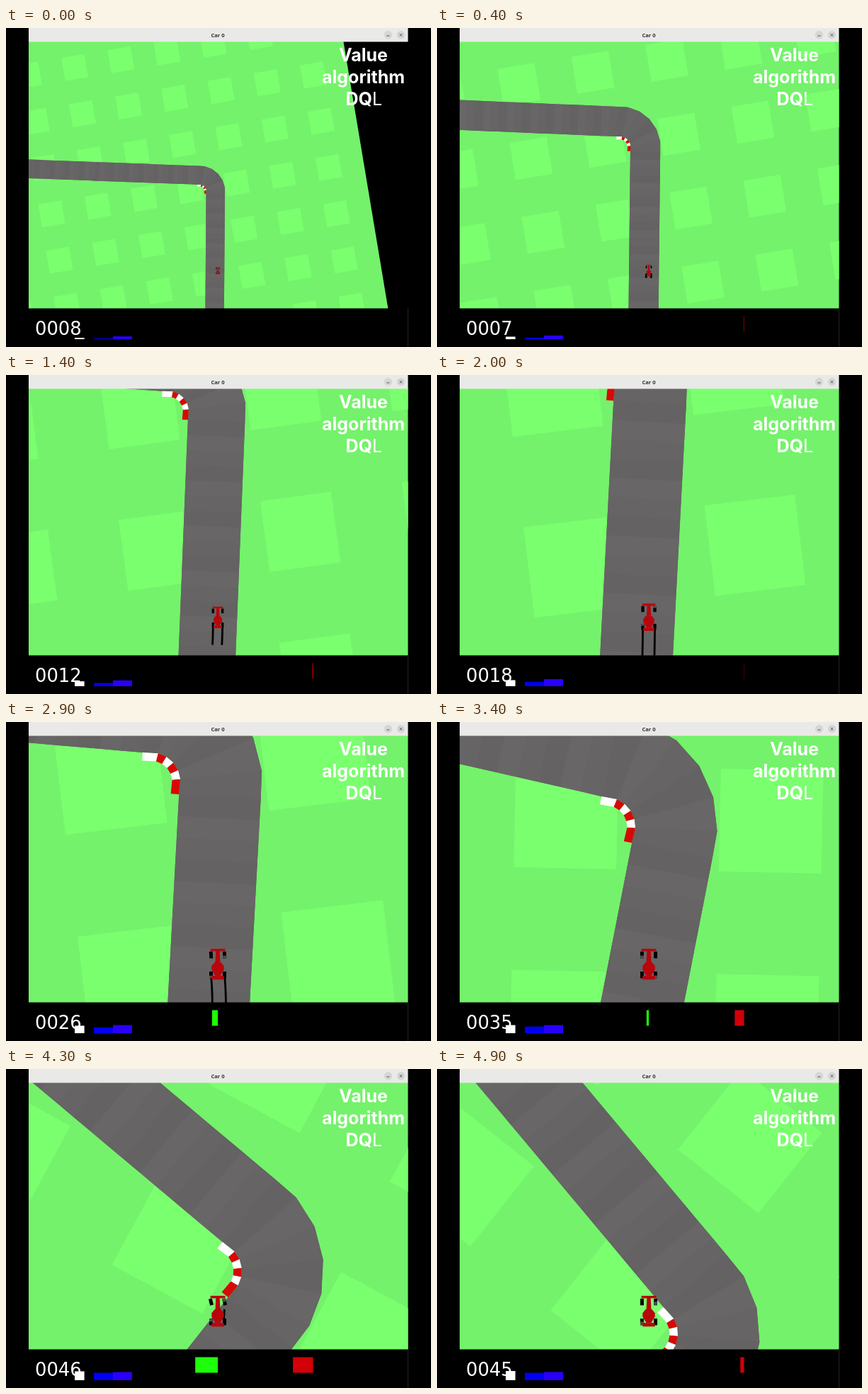
An HTML page with a canvas that plays this animation: 600 by 450 pixels, repeating every 5 s.

```html
<!DOCTYPE html>
<html lang="en">
<head>
<meta charset="utf-8">
<title>Car 0</title>
<style>
html, body { margin: 0; width: 100%; height: 100%; overflow: hidden; background: #000; }
canvas { display: block; width: 600px; height: 450px; }
</style>
</head>
<body>
<canvas id="stage" width="600" height="450"></canvas>
<script>
const ctx = document.getElementById('stage').getContext('2d');
const RAD = Math.PI / 180;
const GRASS = 144.7;        // side of one lawn square at full zoom
const CAR = 0.1736;         // car model units to pixels
const CENTER = { x: 299, y: 342.5 };

// Waypoints of the car on the lawn: time, x, y
const PATH = [
  [0, -131, 588], [0.8, -123.4, 555.3], [2, -109, 455.9], [2.9, -97.5, 352.2],
  [3.8, -102.5, 214.4], [4.3, -126.5, 132], [4.9, -179.5, 60.3]
];
// Turns: start, end, degrees
const TURNS = [[0, 2.2, 2.7], [2.9, 3.8, 13.7], [3.78, 4.55, 28.5], [4.4, 5.4, 6]];
const SLOPES = pathSlopes();
const ROAD = buildRoad();

function pathSlopes() {
  const last = PATH.length - 1;
  const chord = (i, k) => (PATH[i + 1][k] - PATH[i][k]) / (PATH[i + 1][0] - PATH[i][0]);
  const inner = (i, k) => {
    const before = PATH[i][0] - PATH[i - 1][0], after = PATH[i + 1][0] - PATH[i][0];
    return (chord(i - 1, k) * after + chord(i, k) * before) / (before + after);
  };
  return PATH.map((_, i) => [1, 2].map(k => {
    if (i === 0) return 1.5 * chord(0, k) - 0.5 * inner(1, k);
    if (i === last) return 1.5 * chord(last - 1, k) - 0.5 * inner(last - 1, k);
    return inner(i, k);
  }));
}

// Walk along the centre line; tiles 0 to 5 make the bend.
// Each cut across the road is a function from side offset to a point.
function buildRoad() {
  const STEP = 30.5, BEFORE = 28, AFTER = 50;
  const heading = i => (-16.8 + 17.65 * Math.min(5, Math.max(0, i))) * RAD;
  let x = 347 + BEFORE * STEP * Math.sin(heading(0));
  let y = 250 + BEFORE * STEP * Math.cos(heading(0));
  const cuts = [];
  for (let i = -BEFORE; i < AFTER; i++) {
    const h = heading(i), a = (heading(i - 1) + h) / 2, px = x, py = y;
    cuts.push({ i, at: side => [px + side * Math.cos(a), py - side * Math.sin(a)] });
    x -= STEP * Math.sin(h);
    y -= STEP * Math.cos(h);
  }
  return cuts;
}

function position(t) {
  let i = 0;
  while (i < PATH.length - 2 && t > PATH[i + 1][0]) i++;
  const a = PATH[i], b = PATH[i + 1], d = b[0] - a[0];
  const s = (t - a[0]) / d, r = 1 - s;
  return [1, 2].map(k =>
    a[k] + (b[k] - a[k]) * s * s * (3 - 2 * s) +
    d * s * r * (SLOPES[i][k - 1] * r - SLOPES[i + 1][k - 1] * s));
}

function pose(t) {
  const [x, y] = position(t);
  let deg = -9.5, rate = 0;
  for (const [from, to, amount] of TURNS) {
    const s = Math.min(1, Math.max(0, (t - from) / (to - from)));
    deg += amount * s * s * (3 - 2 * s);
    rate += amount / (to - from) * 6 * s * (1 - s);
  }
  return { x, y, angle: deg * RAD, rate };
}

const bump = (t, mid, half) => Math.max(0, 1 - ((t - mid) / half) ** 2);
const steering = t => 12 * bump(t, 3.1, 0.35) + 32 * bump(t, 4.27, 0.4);

function poly(points, fill) {
  ctx.fillStyle = fill;
  ctx.beginPath();
  points.forEach(([x, y]) => ctx.lineTo(x, y));
  ctx.fill();
}

function rect(x, y, w, h, fill) {
  ctx.fillStyle = fill;
  ctx.fillRect(x, y, w, h);
}

function label(text, x, y, font, fill, align) {
  ctx.font = font;
  ctx.fillStyle = fill;
  ctx.textAlign = align;
  ctx.fillText(text, x, y);
}

function drawLawn() {
  rect(-34 * GRASS, -34 * GRASS, 40 * GRASS, 68 * GRASS, '#74f26b');
  for (let i = -20; i < 6; i += 2) {
    for (let j = -20; j < 20; j += 2) {
      rect(i * GRASS, j * GRASS, GRASS, GRASS, '#7aff6e');
    }
  }
}

function drawRoad() {
  const HALF = 57.8, KERB = 11.6;
  const band = (a, b, from, to, fill) =>
    poly([a.at(from), a.at(to), b.at(to), b.at(from)], fill);
  ctx.save();
  ctx.rotate(-6.9 * RAD);
  ctx.translate(-427, -142);
  poly([...ROAD.map(c => c.at(-HALF)), ...ROAD.map(c => c.at(HALF)).reverse()], '#666464');
  ROAD.slice(1).forEach((cut, n) => {
    const shade = 100 + 2 * (n % 3);
    band(ROAD[n], cut, -HALF, HALF, `rgb(${shade},${shade - 2},${shade - 2})`);
  });
  ROAD.forEach((cut, n) => {
    if (cut.i < 0 || cut.i > 5) return;
    band(cut, ROAD[n + 1], -HALF - KERB, -HALF, cut.i % 2 ? '#fff' : '#d80808');
  });
  ctx.restore();
}

// Tyre mark left between two times by the wheel at (wx, wy)
function drawSkid(t, zoom, from, to, wx, wy) {
  const end = Math.min(to, t);
  if (end <= from) return;
  ctx.strokeStyle = '#000';
  ctx.lineWidth = 2.8 / zoom;
  ctx.beginPath();
  for (let i = 0; i <= 20; i++) {
    const { x, y, angle } = pose(from + (end - from) * i / 20);
    const c = Math.cos(angle) * CAR, s = Math.sin(angle) * CAR;
    ctx.lineTo(x + wx * c - wy * s, y - wx * s - wy * c);
  }
  ctx.stroke();
}

function drawSkids(t, zoom) {
  for (const side of [-55, 55]) {
    drawSkid(t, zoom, 0.03, 0.4, side, -82);
    drawSkid(t, zoom, 0.85, 2.87, side, -82);
  }
  drawSkid(t, zoom, 4.16, 4.24, 55, 80);
}

function drawWheel(x, y, turn, spin) {
  ctx.save();
  ctx.translate(x, y);
  ctx.rotate(turn);
  rect(-14, -27, 28, 54, '#000');
  if (Math.sin(spin) < 0 && Math.sin(spin + 1.2) < 0) {
    const a = 27 * Math.cos(spin), b = 27 * Math.cos(spin + 1.2);
    rect(-14, a, 28, b - a, '#4d4d4d');
  }
  ctx.restore();
}

function drawCar(t, zoom) {
  const RED = '#b8060c';
  const mirror = half => [...half, ...half.map(([x, y]) => [-x, y]).reverse()];
  ctx.save();
  ctx.translate(CENTER.x, CENTER.y);
  ctx.scale(zoom * CAR, -zoom * CAR);
  for (const x of [-55, 55]) {
    drawWheel(x, 80, steering(t) / 134, t * 19 + x);
    drawWheel(x, -82, 0, t * 19 - x);
  }
  rect(-60, 110, 120, 20, RED);
  rect(-50, -120, 100, 30, RED);
  poly(mirror([[15, 120], [20, 20]]), RED);
  poly(mirror([[25, 20], [50, -10], [50, -40], [20, -90]]), RED);
  ctx.restore();
}

function drawHud(t, rate) {
  rect(32, 395.5, 536, 54.5, '#000');
  rect(567, 395.5, 1, 54.5, '#242424');

  const rising = (x, w, h, fill) => rect(x, 439 - h, w, h, fill);
  rising(97, 13.6, 2 + 4 * t - 0.36 * t * t, '#fff');
  rising(124, 27, Math.min(10.5, 1.2 + 2.4 * t), '#0000f0');
  rising(151, 27, Math.min(11.5, 4 + 3 * t), '#2a00f8');

  const leftward = (x, w, fill) => rect(x - w, 406.5, w, 22, fill);
  leftward(299, steering(t), '#1cff08');
  leftward(433.5, rate * 35 / 60, '#d20008');

  // Each new road tile pays, time costs
  const tiles = Math.min(14, Math.floor(0.85 * t + 0.62 * t * t));
  const score = Math.floor(8.85 + 3.4 * tiles - 2.2 * t);
  label(String(score).padStart(4, '0'), 41, 433,
    '25.8px "DejaVu Sans", sans-serif', '#fff', 'left');
}

function drawTitleBar() {
  rect(32, 0, 535.5, 19.5, '#e9e9e7');
  label('Car 0', 299, 12.7, 'bold 7.6px "Open Sans", sans-serif', '#333', 'center');
  for (const x of [539.5, 557.5]) {
    ctx.fillStyle = '#d6d6d4';
    ctx.beginPath();
    ctx.arc(x, 9.8, 5.7, 0, 7);
    ctx.fill();
  }
  ctx.strokeStyle = '#444';
  ctx.lineWidth = 0.9;
  ctx.beginPath();
  ctx.moveTo(537.5, 11); ctx.lineTo(541.5, 11);
  ctx.moveTo(555.7, 8); ctx.lineTo(559.3, 11.6);
  ctx.moveTo(559.3, 8); ctx.lineTo(555.7, 11.6);
  ctx.stroke();
}

function drawCaption() {
  const face = '25px Inter, "Open Sans", sans-serif';
  label('Value', 504.5, 47, '700 ' + face, '#fff', 'center');
  label('algorithm', 504.5, 78, '700 ' + face, '#fff', 'center');
  label('DQ', 517, 109, '700 ' + face, '#fff', 'right');
  label('L', 517, 109, '400 ' + face, '#fff', 'left');
}

function render(t) {
  const { x, y, angle, rate } = pose(t);
  const zoom = Math.min(1, 0.2285 + 0.345 * t - 0.0075 * t * t);
  rect(0, 0, 600, 450, '#000');

  ctx.save();
  ctx.beginPath();
  ctx.rect(32, 19, 535.5, 377);
  ctx.clip();
  ctx.save();
  ctx.translate(CENTER.x, CENTER.y);
  ctx.scale(zoom, zoom);
  ctx.rotate(angle);
  ctx.translate(-x, -y);
  drawLawn();
  drawRoad();
  drawSkids(t, zoom);
  ctx.restore();
  drawCar(t, zoom);
  ctx.restore();

  drawHud(t, rate);
  drawTitleBar();
  drawCaption();
}

function tick(now) {
  render(Math.floor(now / 100) % 50 / 10);
  requestAnimationFrame(tick);
}
render(0);
requestAnimationFrame(tick);
</script>
</body>
</html>
```
